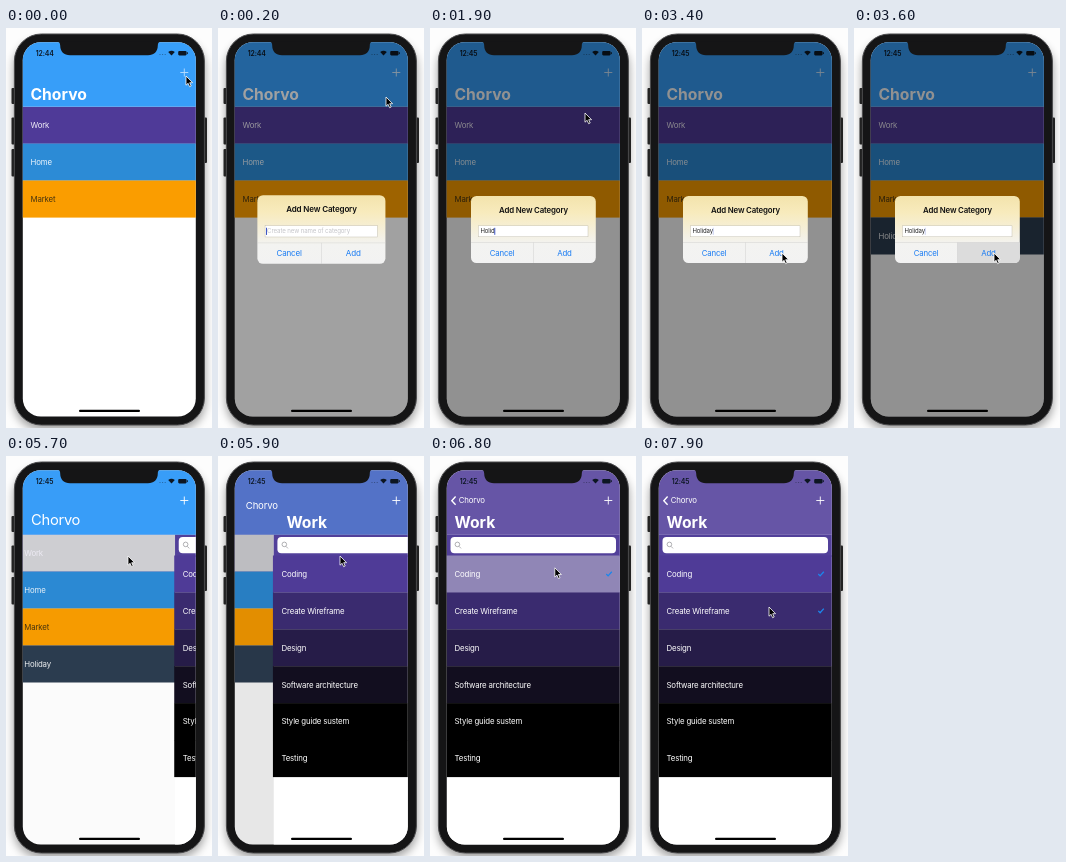
Recreate the animation shown at these times as an HTML page. Size 206 px wide and 400 px high, loop 8 s.

```html
<!DOCTYPE html>
<html lang="en">
<head>
<meta charset="utf-8">
<title>Category list</title>
<style>
  html, body { margin: 0; width: 100%; height: 100%; overflow: hidden; background: #fdfdfd; }
  svg { display: block; width: 100vw; height: 100vh; }
  text { font-family: Inter, Roboto, sans-serif; font-size: 7.84px; letter-spacing: -.02em; fill: #fff; white-space: pre; }
  .large { font-size: 15.7px; font-weight: 700; letter-spacing: 0; }
  .clock { font-size: 6.9px; font-weight: 600; fill: #0c1622; }
  .title { font-weight: 600; fill: #111; text-anchor: middle; }
  .button { fill: #1a7cf3; text-anchor: middle; }
  .small { font-size: 6px; }
</style>
</head>
<body>
<svg viewBox="0 0 206 400" preserveAspectRatio="none">
  <defs>
    <clipPath id="screen"><rect x="16.8" y="14.2" width="173" height="374.4" rx="18"/></clipPath>
    <filter id="blur" x="-20%" y="-20%" width="140%" height="140%"><feGaussianBlur stdDeviation="5"/></filter>
    <linearGradient id="sheet" x1="0" y1="0" x2="0" y2="1">
      <stop offset="0" stop-color="#f3e3ac"/>
      <stop offset=".25" stop-color="#f8ebbd"/>
      <stop offset=".5" stop-color="#f5efd9"/>
      <stop offset=".72" stop-color="#f3f3f1"/>
      <stop offset="1" stop-color="#f2f2f2"/>
    </linearGradient>
  </defs>

  <rect x="8" y="12" width="191" height="390" rx="28" fill="#000" opacity=".38" filter="url(#blur)"/>
  <g fill="#222">
    <rect x="5.5" y="60" width="4" height="16" rx="1"/>
    <rect x="5.5" y="89.5" width="4" height="27" rx="1"/>
    <rect x="5.5" y="121" width="4" height="27.5" rx="1"/>
    <rect x="197" y="89.5" width="4" height="45.5" rx="1"/>
  </g>
  <rect x="8.4" y="6" width="190" height="391" rx="27" fill="#151516" stroke="#4b4b4d" stroke-width="1"/>

  <g clip-path="url(#screen)">
    <rect x="16" y="14" width="175" height="376" fill="#fff"/>
    <g id="home"></g>
    <rect id="shade" x="16" y="78" width="175" height="312" fill="#000"/>
    <g id="items"></g>
    <rect id="header" x="16" y="14" width="175" height="64.7"/>
    <text id="homeTitle"></text>
    <text id="itemsTitle" class="large" y="71.5">Work</text>
    <path id="chevron" d="M25.6 40.6 21.8 44.7 25.6 48.8" fill="none" stroke="#fff" stroke-width="1.4"/>
    <path id="plus" d="M174.3 44.5h8M178.3 40.5v8" stroke="#fff" stroke-width=".9"/>
    <text id="clock" class="clock" x="29.8" y="27.6"></text>
    <g fill="#0c1622">
      <path d="M153.5 26.5h1m1.6 0h1m1.6 0h1" stroke="#0c1622" stroke-opacity=".4"/>
      <path d="M162.2 24q3.3-2.6 6.6 0L165.5 27.6z"/>
      <rect x="172.2" y="22.9" width="8.4" height="4.5" rx="1.1"/>
      <rect x="181.1" y="24.2" width=".8" height="1.9"/>
    </g>
    <rect x="73" y="381.8" width="61" height="2.2" rx="1.1" fill="#000"/>
    <rect id="dim" x="16" y="14" width="175" height="376" fill="#000"/>

    <g id="alert">
      <rect x="41" y="168" width="124.8" height="67" rx="5.5" fill="url(#sheet)"/>
      <path id="pressed" d="M103.5 214.5h62.3v15q0 5.5-5.5 5.5h-56.8z" fill="#dcdcdc"/>
      <path d="M41 214.5h124.8M103.5 214.5v20.5" stroke="#c8c8c8" stroke-width=".4"/>
      <text class="title" x="103.5" y="184.8">Add New Category</text>
      <rect x="48.5" y="197.8" width="109.5" height="11" fill="#fff" stroke="#b9b5a5" stroke-width=".4"/>
      <text id="hint" class="small" x="50.5" y="205.4" style="fill:#c4c4c8">Create new name of category</text>
      <text id="entry" class="small" x="50.5" y="205.4" style="fill:#222"></text>
      <rect id="caret" y="199.8" width=".9" height="7" fill="#2b46c0"/>
      <text class="button" x="72" y="227.7">Cancel</text>
      <text class="button" x="134.5" y="227.7">Add</text>
    </g>
  </g>

  <path d="M50 13.5H156c-3 0-4.2 1.200-4.200 4 0 6-3.800 9.800-9.800 9.800H64c-6 0-9.800-3.800-9.800-9.800 0-2.800-1.200-4-4.200-4z" fill="#151516"/>
  <path id="cursor" d="M0 0V9.200L2.100 7.300 3.600 10.700 5.200 10 3.700 6.700H6.600z" fill="#000" stroke="#fff" stroke-width=".8"/>
</svg>

<script>
const LOOP = 8000, STEP = 100, LEFT = 16.8, ROW = 36.9, APP = "Chorvo";
const el = id => document.getElementById(id);
const set = (id, attrs) => {
  for (const name in attrs) el(id).setAttribute(name, attrs[name]);
};

// Rows are [label, fill, text colour].
const categories = [
  ["Work", "#4f3a98", "#f1eef8"], ["Home", "#2c8bd6", "#eaf4fc"],
  ["Market", "#fa9d00", "#49350f"], ["Holiday", "#2c3d50", "#f1f3f5"]
];
const tasks = [
  ["Coding", "#4f3b97", "#fff"], ["Create Wireframe", "#3a2b6f", "#fff"],
  ["Design", "#261c48", "#fff"], ["Software architecture", "#120e1f", "#fff"],
  ["Style guide sustem", "#000", "#fff"], ["Testing", "#000", "#fff"]
];

const rows = (list, top, prefix) => list.map(([label, fill, ink], i) => {
  const y = top + i * ROW;
  return `<g id="${prefix}${i}">
    <rect x="16" y="${y}" width="175" height="${ROW + .2}" fill="${fill}"/>
    <rect id="${prefix}Flash${i}" x="16" y="${y}" width="175" height="${ROW}" fill="#d1d1d5" opacity="0"/>
    <text x="24.5" y="${y + 21.3}" style="fill:${ink}">${label}</text></g>`;
}).join("");

const check = (id, y) =>
  `<path id="${id}" d="M176.300 ${y}l1.800 1.900 3.700-4.200" fill="none" stroke="#1b86ec" stroke-width="1.300"/>`;

el("home").innerHTML = rows(categories, 78.7, "category");
el("items").innerHTML = `
  <rect x="16.800" y="78.500" width="175" height="312" fill="#fff"/>
  <rect x="16.800" y="78.500" width="175" height="22" fill="#52409a"/>
  <rect x="20.500" y="81" width="165.500" height="16.300" rx="4" fill="#fff"/>
  <path d="M29 90.300l2 2.100M29.700 88.400a2.300 2.300 0 1 1-4.600 0 2.300 2.300 0 1 1 4.600 0" fill="none" stroke="#8e8e93" stroke-width=".7"/>
  ${rows(tasks, 99.5, "task")}${check("check0", 118)}${check("check1", 154.9)}`;

const tracks = {
  cursor: [[0, 180, 48], [100, 176, 56], [200, 168, 69], [400, 160, 79], [900, 155, 85],
    [2600, 155, 85], [3000, 149, 150], [3300, 140, 225], [4400, 140, 225], [4800, 141, 159],
    [5200, 122, 100], [6100, 122, 100], [6400, 124, 111], [6900, 125, 112], [7300, 127, 151]],
  dim: [[0, 0], [100, .2], [200, .37], [400, .43], [3600, .43], [3700, .26], [3800, .11], [3900, .03], [4000, 0]],
  alert: [[0, 0], [100, .5], [200, 1], [3600, 1], [3700, .55], [3800, .2], [3900, 0]],
  zoom: [[100, 1.1], [200, 1.026], [300, 1.008], [400, 1]],
  push: [[5600, 0], [5700, .12], [5800, .48], [5900, .775], [6000, .91], [6100, .97], [6200, 1]],
  flash0: [[6500, 0], [6600, 1], [6700, .75], [7000, 0]],
  flash1: [[7300, 0], [7400, 1], [7500, .75], [7800, 0]]
};

function at(name, t) {
  const keys = tracks[name];
  const next = keys.findIndex(key => key[0] > t);
  if (next === 0) return keys[0].slice(1);
  if (next < 0) return keys[keys.length - 1].slice(1);
  const a = keys[next - 1], b = keys[next];
  const k = (t - a[0]) / (b[0] - a[0]);
  return a.slice(1).map((v, i) => v + (b[i + 1] - v) * k);
}

const typing = [[1600, 1], [1700, 2], [1800, 3], [1900, 5], [2100, 6], [2400, 7]];
const mix = (a, b, k) => `rgb(${a.map((v, i) => Math.round(v + (b[i] - v) * k))})`;
const show = (id, on) => set(id, { opacity: +on });

function drawAlert(t) {
  const [zoom] = at("zoom", t);
  const typed = typing.reduce((n, [start, count]) => t >= start ? count : n, 0);
  set("dim", { opacity: at("dim", t)[0] });
  set("alert", {
    opacity: at("alert", t)[0],
    transform: `translate(103.4 201.5) scale(${zoom}) translate(-103.4 -201.5)`
  });
  show("hint", !typed);
  show("pressed", t >= 3500 && t < 3700);
  el("entry").textContent = "Holiday".slice(0, typed);
  set("caret", {
    x: 50.3 + (typed ? el("entry").getComputedTextLength() : -.8),
    opacity: t >= 3300 ? .3 : 1
  });
}

function drawPush(t) {
  const [p] = at("push", t), rest = 1 - p;
  set("home", { transform: `translate(${-52 * p} 0)`, opacity: +(p < 1) });
  set("shade", { opacity: p < 1 ? .12 * p : 0 });
  set("items", { transform: `translate(${173 * rest} 0)`, opacity: +(p > 0) });
  set("header", { fill: mix([55, 158, 249], [102, 85, 166], p * p) });
  set("homeTitle", {
    x: 24.5 + 4.3 * p,
    y: 47.4 + 24.1 * rest,
    style: p ? `font-size:${7.84 * (1 + rest)}px` : "",
    class: p ? "" : "large"
  });
  set("itemsTitle", { x: 24.5 + 195 * rest, opacity: +(p > 0) });
  set("chevron", { opacity: Math.max(0, (p - .8) / .2) });
}

function draw(t) {
  const [x, y] = at("cursor", t);
  set("cursor", { transform: `translate(${x} ${y})` });
  el("clock").textContent = t < 1600 ? "12:44" : "12:45";
  set("plus", { opacity: t < 100 ? .65 : t < 4000 ? .8 : 1 });
  show("category3", t >= 3600);
  show("categoryFlash0", t >= 5600);
  drawAlert(t);
  drawPush(t);
  for (const i of [0, 1]) set("taskFlash" + i, { opacity: at("flash" + i, t)[0] });
  show("check0", t >= 6700);
  show("check1", t >= 7500);
}

el("homeTitle").textContent = APP;
const start = performance.now();
function tick() {
  const t = (performance.now() - start) % LOOP;
  draw(Math.floor(t / STEP) * STEP);
  requestAnimationFrame(tick);
}
tick();
</script>
</body>
</html>
```
